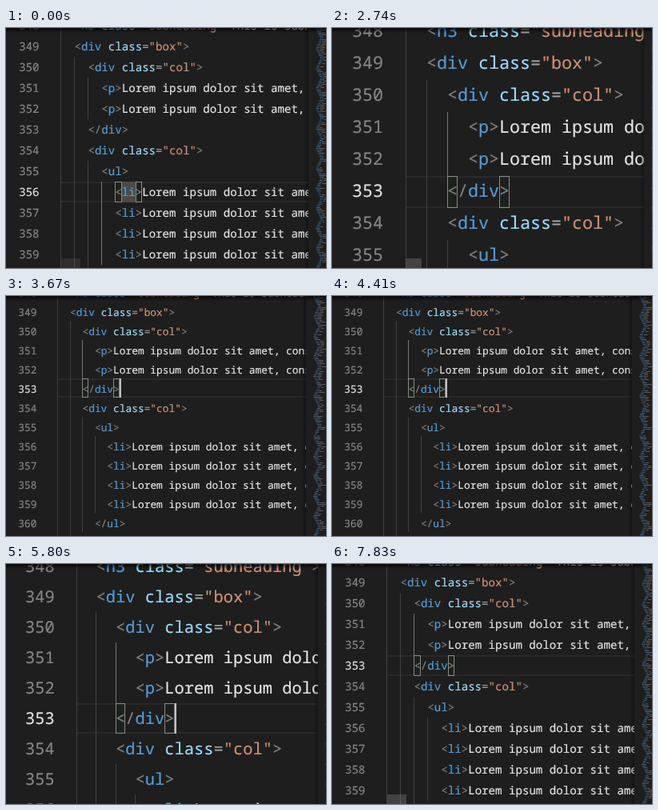
Animation, 400 px wide and 300 px high, one loop 7880 ms. Source, as an HTML page:

```html
<!DOCTYPE html>
<html lang="en">
<head>
<meta charset="utf-8">
<title>Editor zoom</title>
<style>
  html, body { margin: 0; width: 100%; height: 100%; overflow: hidden; background: #1e1e1e; }
  #stage {
    position: relative; width: 400px; height: 300px; overflow: hidden; background: #1e1e1e;
    font-family: "Noto Sans Mono", "DejaVu Sans Mono", monospace;
    font-size: calc(var(--cw) / .6);
    line-height: var(--lh);
    text-rendering: geometricPrecision;
    font-variant-ligatures: none;
    -webkit-text-stroke: .2px;
    white-space: pre;
    color: #e4e4e4;
  }
  #stage div, #stage i, #map { position: absolute; }
  #code { left: 0; top: 0; width: var(--edge); height: 300px; overflow: hidden; }
  .row { left: 0; right: 0; height: var(--lh); top: calc(var(--top) + var(--lh) * var(--i)); }
  .num, .text { top: calc((32.5px - var(--lh)) * .1); }
  .num { left: 0; width: calc(var(--lh) * 1.6); text-align: right; color: #858585; }
  .text { left: calc(var(--base) + var(--cw) * var(--col)); }
  .guide { left: calc(var(--base) + var(--cw) * var(--col) - .4px); top: 0; width: 1px; height: 100%; background: #404040; }
  .current .num { color: #e0e0e0; }
  .line { display: none; left: var(--base); right: 0; top: 0; bottom: 0; box-sizing: border-box; border: solid #292929; border-width: 2px 0; }
  .current .line { display: block; }
  .guide.active { background: #747474; }
  .mark, .word, #caret { top: 0; height: 100%; left: calc(var(--base) + var(--cw) * var(--col)); display: none; }
  .mark { width: var(--cw); box-sizing: border-box; border: 1px solid #888; background: rgba(0, 100, 0, .04); }
  .word { width: calc(var(--cw) * 2); background: #4b4b4b; }
  .current .mark, .current .word { display: block; }
  #caret { width: 2px; background: #c0c0bc; }
  .p { color: #808080; } .t { color: #569cd6; } .a { color: #9cdcfe; } .s { color: #ce9178; } .e { color: #a0a0a0; }
  #edge { left: calc(var(--edge) - 6px); top: 0; width: 6px; height: 300px; background: linear-gradient(90deg, transparent, rgba(0, 0, 0, .35)); }
  #shade { left: 0; top: 0; width: 100%; height: 6px; background: linear-gradient(rgba(0, 0, 0, .75), transparent); }
  #map { left: calc(var(--edge) + 8px); top: 0; }
  #slider { left: var(--base); top: 288px; width: calc(34px - var(--lh) * .35); height: 12px; background: #797979; }
</style>
</head>
<body>
<div id="stage">
  <div id="code"></div>
  <svg id="map" width="22" height="300"></svg>
  <div id="edge"></div>
  <div id="shade"></div>
  <div id="slider"></div>
</div>
<script>
const LOOP = 7880, FIRST = 348, CLICK = 850;
const stage = document.getElementById('stage');
const code = document.getElementById('code');
const slider = document.getElementById('slider');

const lorem = 'Lorem ipsum dolor sit amet, consectetur adipisicing elit.';
const source = `
  <h3 class="subheading">This is subheading</h3>
  <div class="box">
    <div class="col">
      <p>${lorem}</p>
      <p>${lorem}</p>
    </div>
    <div class="col">
      <ul>
${`        <li>${lorem}</li>\n`.repeat(4)}      </ul>
    </div>
  </div>`;

const span = (cls, text) => `<span class="${cls}">${text}</span>`;
const at = (cls, col) => `<i class="${cls}" style="--col:${col}"></i>`;

function paintTag(all, open, name, attr, value) {
  return span('p', open.replace('<', '&lt;')) + span('t', name) +
    (attr ? ' ' + span('a', attr) + span('e', '=') + span('s', value) : '') + span('p', '&gt;');
}

function rowHtml(line, i) {
  const text = line.trimStart(), col = line.length - text.length, n = FIRST + i;
  const html = text.replace(/(<\/?)(\w+)(?: (\w+)=("\w+"))?>/g, paintTag);
  let extra = '';
  for (let c = 0; c < col; c += 2) extra += at('guide', c);
  if (n === 353) extra += at('mark', col) + at('mark', col + 5);
  if (n === 356) extra += at('word', col + 1) + at('mark', col) + at('mark', col + 3);
  const caret = n === 353 ? `<i id="caret" style="--col:${col + 6}"></i>` : '';
  return `<div class="row" style="--i:${i}"><div class="line"></div>${extra}` +
    `<div class="num">${n}</div><div class="text" style="--col:${col}">${html}</div>${caret}</div>`;
}
code.innerHTML = source.slice(1).split('\n').map(rowHtml).join('');
const rows = [...code.children];
const caret = document.getElementById('caret');

// Minimap: a blue zigzag of tiny code with grey text beside it
let seed = 7;
const rand = () => (seed = seed * 16807 % 2147483647) / 2147483647;
const bar = (x, y, w, fill, alpha) =>
  `<rect x="${x}" y="${y}" width="${w}" height="1" fill="${fill}" opacity="${alpha}"/>`;
let map = '';
for (let y = 0; y < 300; y += 2) {
  const x = 1 + 6 * (1 - Math.abs(y % 25 / 12.5 - 1));
  map += bar(x, y, 3 + rand() * 3, '#4a7198', .5 + rand() * .4);
  if (rand() < .6) map += bar(x + 5, y, 2 + rand() * 5, '#a09a92', .5);
}
document.getElementById('map').innerHTML = map;

// Bursts of wheel steps: [first step, last step, signed count]
const bursts = [
  [1730, 2220, 6], [3060, 3770, -8], [4360, 4860, 6], [5040, 5170, 2], [5350, 5490, 2],
  [5670, 5800, -3], [5850, 6170, -3], [6350, 6420, -2], [6600, 6690, -2], [6770, 6860, 2]
];

// Zoom level and the time of the latest step
function zoomAt(t) {
  let level = 1, since = 0;
  for (const [from, to, count] of bursts) {
    if (t < from) break;
    const last = Math.abs(count) - 1, gap = (to - from) / last;
    const done = Math.min(last, Math.floor((t - from) / gap));
    level += Math.sign(count) * (done + 1);
    since = from + done * gap;
  }
  return { level, since };
}

function setZoom(k) {
  const lh = Math.floor(24.28 + 2.35 * k);
  const vars = {
    lh,
    cw: 7.72 + .755 * k,
    base: 64.6 + 3.92 * k,
    top: Math.floor(.07 * lh - 17.75),
    edge: Math.min(390, 375 + 3 * k)
  };
  for (const name in vars) stage.style.setProperty('--' + name, vars[name] + 'px');
}

// Scrollbar: [fade start, fade end, hidden again]
const reveals = [[2490, 2740, 3060], [3970, 4100, 4280], [7360, 7830, LOOP]];

function sliderAlpha(t) {
  if (t < 110) return .45 * (1 - t / 110);
  const r = reveals.find(([from, , to]) => t >= from && t < to);
  return r ? Math.min(1, (t - r[0]) / (r[1] - r[0])) : 0;
}

function setCurrent(n) {
  const [level, from, to] = n === 356 ? [3, 356, 359] : [2, 351, 352];
  rows.forEach((row, i) => {
    const num = FIRST + i;
    row.classList.toggle('current', num === n);
    row.querySelectorAll('.guide').forEach((g, k) =>
      g.classList.toggle('active', k === level && num >= from && num <= to));
  });
}

let shownLevel, shownLine;
function draw(now) {
  const t = now % LOOP;
  const { level, since } = zoomAt(t);
  const line = t < CLICK ? 356 : 353;
  if (level !== shownLevel) setZoom(shownLevel = level);
  if (line !== shownLine) setCurrent(shownLine = line);
  const lit = t >= CLICK && t - Math.max(since, CLICK) < 500;
  caret.style.display = lit ? 'block' : 'none';
  slider.style.opacity = .4 * sliderAlpha(t);
}

const start = performance.now();
function tick() {
  draw(performance.now() - start);
  requestAnimationFrame(tick);
}
tick();
</script>
</body>
</html>
```
